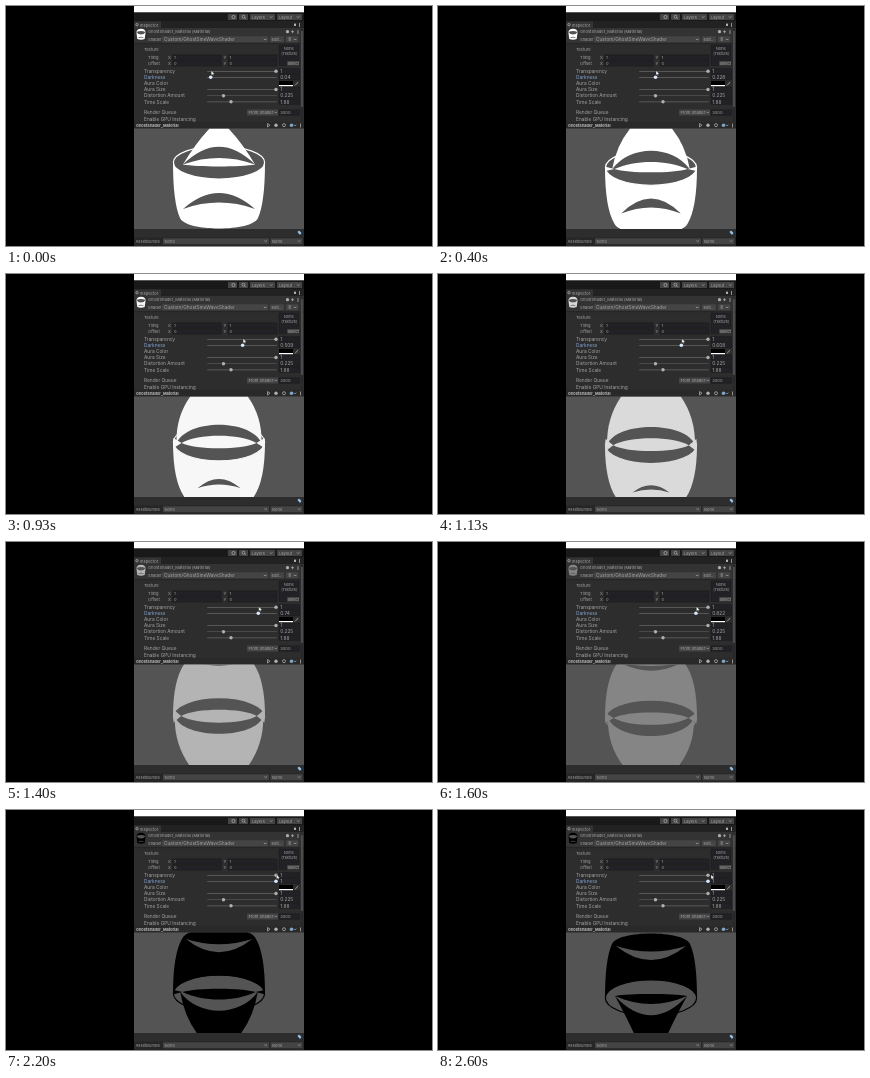
An HTML page for the animation above (2670 ms loop, 426 px wide and 240 px high).

```html
<!DOCTYPE html>
<html lang="en">
<head>
<meta charset="utf-8">
<title>Ghost material inspector</title>
<style>
  html, body { margin: 0; width: 100%; height: 100%; overflow: hidden; background: #000; }
  svg { display: block; width: 100vw; height: 100vh; }
  text { font: 4.8px Inter, "Open Sans", sans-serif; fill: #a4a4a4; }
  .bold { font-size: 3.9px; font-weight: 700; fill: #c0c0c0; }
  .head { font-size: 4.1px; }
  .small { font-size: 3.8px; }
  .focus { fill: #86a2d0; }
  .field { fill: #222226; stroke: #191919; stroke-width: .4; }
  .button { fill: #444; }
  .track { fill: #666; }
  .knob { fill: #b0b0b0; }
  .icon { fill: none; stroke: #aaa; stroke-width: .8; }
  .gap { fill: #545454; }
</style>
</head>
<body>
<svg viewBox="0 0 426 240">
  <defs>
    <clipPath id="view"><rect x="128" y="122.5" width="170" height="100.5"/></clipPath>
  </defs>
  <rect width="426" height="240" fill="#000"/>
  <rect x="128" width="170" height="240" fill="#2d2d2d"/>
  <rect x="128" width="170" height="6.5" fill="#fff"/>
  <rect x="128" y="6.5" width="170" height="9" fill="#191919"/>
  <rect x="128" y="15.5" width="170" height="6.5" fill="#222"/>
  <rect x="128" y="15.5" width="27" height="6.5" fill="#343434"/>
  <rect x="128" y="22" width="170" height="15.5" fill="#333"/>
  <rect x="128" y="37.5" width="170" height=".6" fill="#1e1e1e"/>
  <rect x="128" y="115.8" width="170" height="6.7" fill="#292929"/>
  <rect class="gap" x="128" y="122.5" width="170" height="100.5"/>
  <rect x="128" y="223" width="170" height="8.5" fill="#2d2d2d"/>
  <rect x="128" y="231.5" width="170" height="8.5" fill="#262626"/>
  <rect x="294.8" y="23" width="2.4" height="92" fill="#292929"/>
  <rect x="295.2" y="25" width="1.5" height="76" fill="#565656"/>
  <g id="panel"></g>

  <g id="thumb">
    <path class="ink" d="M130.5 27Q130 23 135 22.8Q140 23 139.5 27L138.7 33Q135 34.5 131.3 33Z"/>
    <path class="gap" d="M130.5 26Q135 24 139.5 26Q138 28.5 135 28.5Q132 28.5 130.5 26M132 32Q135 29.5 138 32Q135 31 132 32"/>
  </g>

  <g clip-path="url(#view)">
    <g id="ghost">
      <path id="cup" class="ink"/>
      <ellipse id="rim" class="gap" cx="213" rx="45.6" stroke-width="1.2"/>
      <path id="dome" class="ink"/>
      <path id="slot" class="gap"/>
      <path id="lens" class="ink"/>
      <path id="mouth" class="gap"/>
    </g>
  </g>

  <circle id="knob" cy="71.3" r="1.8" fill="#d8e8ff"/>
  <path id="cursor" d="M0 0V4.3L1.1 3.4L1.8 4.8L2.5 4.4L1.9 3.1L3.2 3Z" fill="#fff" stroke="#222" stroke-width=".3"/>
</svg>

<script>
const LOOP = 2670, STEPS = 40, CX = 213, MID = 173;
const el = id => document.getElementById(id);
const panel = el('panel');

function add(tag, attrs, label = '') {
  const node = document.createElementNS('http://www.w3.org/2000/svg', tag);
  for (const key in attrs) node.setAttribute(key, attrs[key]);
  node.textContent = label;
  return panel.appendChild(node);
}
const text = (x, y, label, cls = '') => add('text', { x, y, class: cls }, label);
const box = (x, y, width, height, cls) => add('rect', { x, y, width, height, rx: .6, class: cls });
const line = (d, cls = 'icon') => add('path', { d, class: cls });
const arrow = (x, y) => line(`M${x} ${y}l1.2 1.2l1.2 -1.2`);

// Toolbar and tab
box(222, 8, 9, 6, 'button');
box(233, 8, 9, 6, 'button');
add('circle', { cx: 227.5, cy: 11, r: 1.6, class: 'icon' });
add('circle', { cx: 237.5, cy: 10.7, r: 1.4, class: 'icon' });
line('M238.5 11.8l1.3 1.3');
[['Layers', 244], ['Layout', 271]].forEach(([label, x]) => {
  box(x, 8, 25, 6, 'button');
  text(x + 2, 12.8, label, 'head');
  arrow(x + 20, 10.4);
});
text(134, 20.5, 'Inspector', 'head');
add('circle', { cx: 131, cy: 18.7, r: 1.2, class: 'icon' });
box(288, 17.5, 2, 2.5, 'knob');
line('M293.5 17v4');

// Material header
text(142, 27.4, 'GhostShader_Material (Material)', 'head');
add('circle', { cx: 281.5, cy: 25.7, r: 1.6, class: 'knob' });
line('M285 25.7h3M286.5 24.2v3M292 24v4');
text(142, 34.8, 'Shader', 'head');
box(156, 30.3, 106, 6, 'button');
text(158, 35, 'Custom/GhostSineWaveShader');
arrow(258, 32.8);
box(264, 30.3, 14, 6, 'button');
text(265.5, 35, 'Edit...', 'head');
box(280, 30.3, 12, 6, 'button');
line('M282.5 32h2.5M282.5 34h2.5');
arrow(288, 32.8);

// Texture block
text(138, 44.5, 'Texture', 'head');
box(273, 39, 20, 20.5, 'field');
text(278, 44.3, 'None', 'small');
text(275.2, 48.7, '(Texture)', 'small');
box(281, 55, 12, 4.5, 'button');
text(281.7, 58.6, 'Select', 'small');
[['Tiling', 1, 53.2], ['Offset', 0, 59.2]].forEach(([label, value, y]) => {
  text(142, y, label, 'head');
  [['X', 162], ['Y', 217.5]].forEach(([axis, x]) => {
    text(x, y, axis, 'head');
    box(x + 4.5, y - 4.4, 49, 5.4, 'field');
    text(x + 6, y, value, 'head');
  });
});

// Sliders
const rows = [
  ['Transparency', 67, '1', 270],
  ['Darkness', 73, '', 0],
  ['Aura Size', 85.2, '1', 270],
  ['Distortion Amount', 91.4, '0.225', 217.5],
  ['Time Scale', 97.5, '1.88', 225]
];
const values = rows.map(([label, y, value, x]) => {
  text(138, y, label, x ? '' : 'focus');
  box(201, y - 2, 70, .7, 'track');
  if (x) add('circle', { cx: x, cy: y - 1.7, r: 1.7, class: 'knob' });
  box(273, y - 4.4, 20.5, 5.3, 'field');
  return text(274.2, y, value);
});
text(138, 79.2, 'Aura Color');
add('rect', { x: 273, y: 75, width: 14, height: 4, fill: '#000' });
add('rect', { x: 273, y: 79, width: 14, height: 1.2, fill: '#fff' });
line('M289 79.5l3 -3.5');

text(138, 108.3, 'Render Queue');
box(241, 103.5, 31, 6, 'button');
text(242.5, 108.2, 'From Shader', 'head');
arrow(268.5, 105.8);
box(273, 103.8, 20.5, 5.5, 'field');
text(274.2, 108.2, '3000', 'head');
text(138, 115, 'Enable GPU Instancing');

// Preview header and footer
text(130, 120.6, 'GhostShader_Material', 'bold');
line('M261.5 117.5v3.5l2.5 -1.75z');
add('circle', { cx: 270, cy: 119.2, r: 1.7, class: 'knob' });
add('circle', { cx: 278, cy: 119.2, r: 1.5, class: 'icon' });
add('circle', { cx: 285.5, cy: 119.2, r: 1.8, fill: '#7fa5c8' });
arrow(288, 118.7);
line('M294.5 117.5v4');
add('path', { d: 'M291.5 226l1.5 -1.5l2.5 2.5l-1.5 2z', fill: '#8fc5f0' });
text(129.5, 236.8, 'AssetBundle', 'head');
box(157, 232.3, 106, 6, 'button');
text(158.5, 236.8, 'None', 'head');
arrow(258.5, 234.5);
box(264.5, 232.3, 32, 6, 'button');
text(266, 236.8, 'None', 'head');
arrow(292, 234.5);

function mix(points, t) {
  const i = points.findIndex(p => p[0] > t);
  if (i < 0) return points[points.length - 1][1];
  const [a, v] = points[i - 1], [b, w] = points[i];
  return v + (w - v) * (t - a) / (b - a);
}
const darkness = [[0, .04], [400, .228], [930, .507], [1400, .739], [1870, .933], [2130, 1]];
const shade = [[0, 255], [800, 255], [930, 248], [1400, 180], [1870, 70], [2080, 0]];
const inks = document.querySelectorAll('.ink');
const path = (id, d) => el(id).setAttribute('d', d);

// The second half tilts the other way, so it is drawn upside down.
function drawGhost(tilt) {
  const up = tilt >= 0, u = Math.min(1, Math.abs(tilt)), r = 1 - u;
  el('ghost').setAttribute('transform', up ? '' : `translate(0 ${2 * MID}) scale(1 -1)`);
  const cy = MID - (up ? 16.5 : 15) * u;
  const ry = up ? 18.7 - 2.2 * u * u : 18.5 - .5 * u;
  const horn = cy + 2 * u;

  const foot = 30 + 9 * u ** .8, fy = 212 + 18 * r, side = cy + .72 * (fy - cy);
  path('cup', `M${CX - 46} ${cy}Q${CX - 46} ${side} ${CX - foot} ${fy}` +
    `C${CX - foot + 6} ${fy + 14} ${CX + foot - 6} ${fy + 14} ${CX + foot} ${fy}` +
    `Q${CX + 46} ${side} ${CX + 46} ${cy}Z`);

  el('rim').setAttribute('cy', cy);
  el('rim').setAttribute('ry', ry);

  const top = up ? 30 - 20.5 * u ** 2.2 : 30 - 13 * u ** 1.3;
  const base = 45 - 9 * u, bulge = 45 - 21 * u * u, by = 145 - 7 * u;
  path('dome', `M${CX - base} ${horn}Q${CX - bulge} ${by} ${CX - top} 122.5` +
    `H${CX + top}Q${CX + bulge} ${by} ${CX + base} ${horn}Z`);

  // A symmetric arc between two corners at horn height, peaking at y.
  const arc = (hw, inset, y, s) => {
    const pull = (y - horn / 4) / .75;
    return `C${CX - s * (hw - inset)} ${pull} ${CX + s * (hw - inset)} ${pull} ${CX + s * hw} ${horn}`;
  };
  path('slot', `M${CX - base} ${horn}${arc(base, 6 + 18 * u, cy - ry + .8, 1)}Z`);

  // The lens tips touch small wedges at both ends of the rim.
  const tip = 38 - 2 * u;
  const wedge = s => `M${CX + s * tip} ${horn}L${CX + s * 45.5} ${horn - 7 * r}V${horn + 7 * r}Z`;
  path('lens', `M${CX - tip} ${horn}${arc(tip, 14 + 10 * u, cy - ry + 12, 1)}` +
    `${arc(tip, 14, cy + 6.5 - 2.5 * u, -1)}Z${wedge(-1)}${wedge(1)}`);

  const my = up ? 187 + 12 * r + 18 * r * r : 196 + 24 * r + 5 * r * r;
  const mw = up ? 36 - 20 * r : 35 - 6 * r;
  const mh = (up ? 16 : 14) * Math.min(1, .35 + .85 * u);
  const ends = my + mh;
  const lip = (y, s) => `Q${CX} ${2 * y - ends} ${CX + s * mw} ${ends}`;
  path('mouth', `M${CX - mw} ${ends}${lip(my, 1)}${lip(my + .6 * mh, -1)}Z`);
}

function draw(now) {
  // Steps land on rounded times, slightly early.
  const t = Math.floor(((now + 6) % LOOP) / LOOP * STEPS) * LOOP / STEPS;
  const dark = mix(darkness, t), x = 202 + 68 * dark;
  const g = Math.round(mix(shade, t)), color = `rgb(${g},${g},${g})`;
  inks.forEach(node => node.setAttribute('fill', color));
  el('rim').setAttribute('stroke', color);
  drawGhost((1300 - t) / 1300);
  el('knob').setAttribute('cx', x);
  values[1].textContent = String(+dark.toFixed(3));
  const drift = 2.5 * Math.max(0, t - 2200) / 400;
  el('cursor').setAttribute('transform', `translate(${x + .5 + drift} 64.8)`);
}

const start = performance.now();
function tick() {
  draw(performance.now() - start);
  requestAnimationFrame(tick);
}
tick();
</script>
</body>
</html>
```
